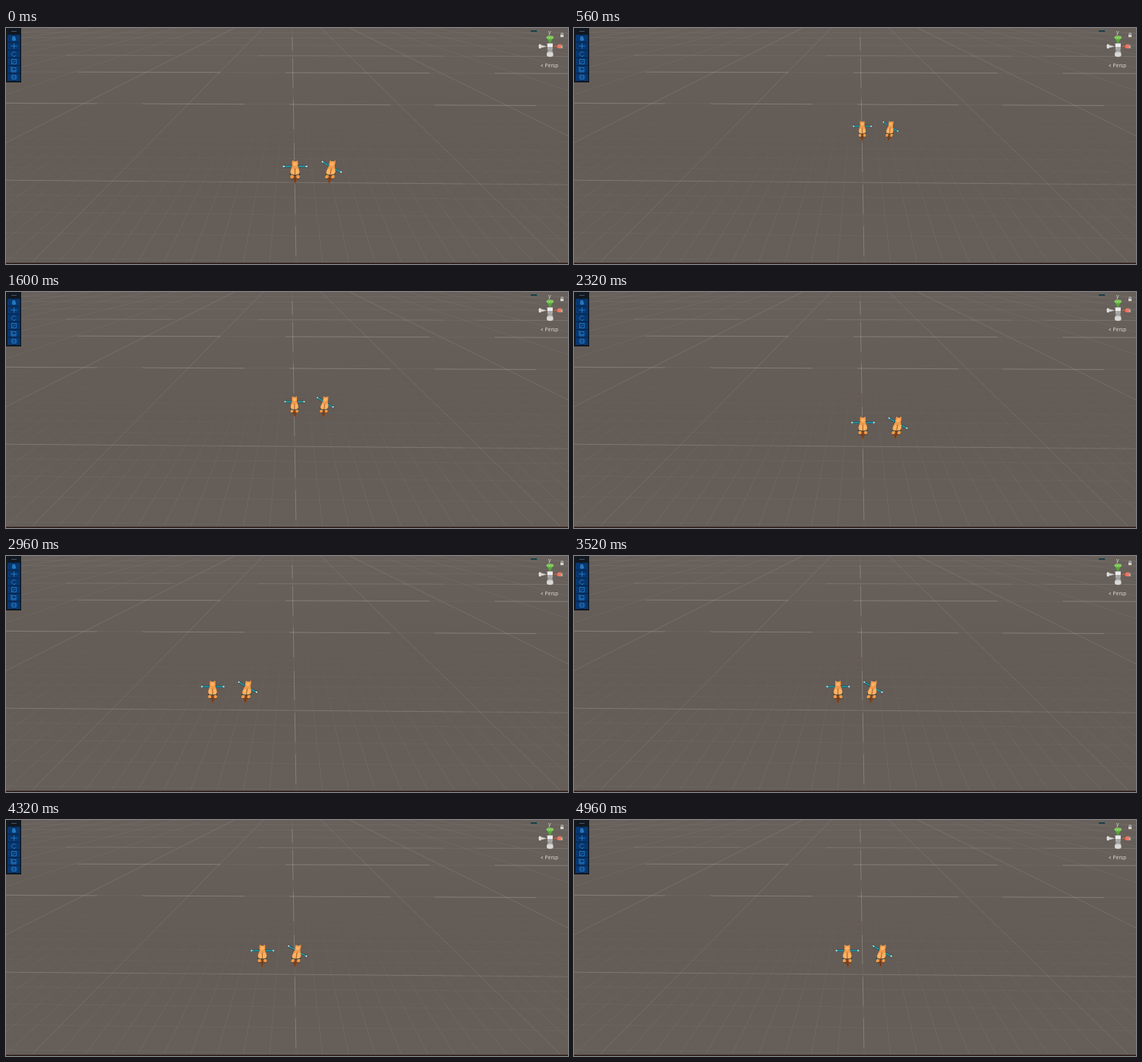
An HTML page with a canvas that plays this animation: 740x312 px, repeating every 5040 ms.

```html
<!DOCTYPE html>
<html lang="en">
<head>
<meta charset="utf-8">
<title>Scene view</title>
<style>
html, body { margin: 0; width: 100%; height: 100%; overflow: hidden; background: #655d57; }
canvas { display: block; width: 740px; height: 312px; }
</style>
</head>
<body>
<canvas id="stage" width="740" height="312"></canvas>
<script>
const W = 740, H = 312, LOOP = 5040, STEP = 80;
const HORIZON = -38, NEAR = 244;
const ctx = document.getElementById('stage').getContext('2d');

// Time in ms against depth (1e-5 / pixels below the horizon) and sideways shift.
const depthKeys = [[0, 410], [125, 410], [685, 567], [1280, 400], [1850, 560], [2320, 429], [LOOP, 429]];
const shiftKeys = [[0, 0], [2320, 0], [3017, -118], [3890, 30], [4575, -86], [LOOP, -7]];

function sample(keys, t) {
  const i = Math.max(1, keys.findIndex(k => k[0] >= t));
  const [t0, a] = keys[i - 1], [t1, b] = keys[i];
  return a + (b - a) * (t - t0) / (t1 - t0);
}

const axisX = y => 376 + (y - HORIZON) * 0.0173;

function line(g, x0, y0, x1, y1, color, width = 1) {
  g.strokeStyle = color;
  g.lineWidth = width;
  g.beginPath();
  g.moveTo(x0, y0);
  g.lineTo(x1, y1);
  g.stroke();
}

function poly(g, color, ...pts) {
  g.fillStyle = color;
  g.beginPath();
  for (let i = 0; i < pts.length; i += 2) g.lineTo(pts[i], pts[i + 1]);
  g.fill();
}

function oval(g, color, x, y, rx, ry) {
  g.fillStyle = color;
  g.beginPath();
  g.ellipse(x, y, rx, ry, 0, 0, 7);
  g.fill();
}

function rect(g, color, x, y, w, h) {
  g.fillStyle = color;
  g.fillRect(x, y, w, h);
}

const white = a => `rgba(225,225,225,${a})`;

function drawGrid(g) {
  const bg = g.createLinearGradient(0, 0, 0, H);
  bg.addColorStop(0, '#67605b');
  bg.addColorStop(0.5, '#635b55');
  bg.addColorStop(1, '#665e58');
  rect(g, bg, 0, 0, W, H);

  const fade = g.createLinearGradient(0, 105, 0, 270);
  fade.addColorStop(0, white(0));
  fade.addColorStop(1, white(0.07));
  const rail = (k, y0, y1, color) =>
    line(g, axisX(y0) + k * (y0 - HORIZON), y0, axisX(y1) + k * (y1 - HORIZON), y1, color);

  for (let i = -40; i <= 40; i++) if (i % 10) rail(i / 10, 105, 309, fade);
  for (let k = -8; k <= 8; k++) if (k) rail(k, 0, 309, white(Math.abs(k) < 3 ? 0.12 : 0.05));
  rail(0, 0, 309, white(0.07));
  for (const y of [12, 40, 95, 152, 207, 262]) rail(0, y, y + (y < 40 ? 18 : 39), white(0.19));

  // Cross lines are evenly spaced in depth and tilt slightly down to the right.
  const cross = (u, x0, x1, color) => {
    const mid = 1e5 / u + HORIZON, tilt = (mid - HORIZON) * 0.000033;
    line(g, x0, mid + (x0 - 370) * tilt, x1, mid + (x1 - 370) * tilt, color);
  };
  for (let i = -9; i <= 4; i++) {
    const u = 413 - 31 * i;
    if (i) cross(u, 0, W, white(i < 0 ? 0.035 * (10 + i) / 10 : 0.045));
  }
  for (let i = 0; i < 7; i++) cross(413 + 308 * i, 0, W, white(i ? 0.05 : 0.14));
  const dashes = [
    [413, [[0, 185], [290, 372], [380, 600]], 0.06],
    [719, [[0, 120], [180, 314], [373, 506], [565, 698]], 0.2],
    [1031, [[95, 282], [368, 557], [643, W]], 0.2],
    [1340, [[80, 222], [332, 576], [620, W]], 0.1]
  ];
  for (const [u, spans, a] of dashes) for (const [a0, a1] of spans) cross(u, a0, a1, white(a));

  rect(g, '#291918', 0, 310.5, W, 1.5);
}

function drawToolbar(g) {
  rect(g, '#111820', 0, 0, 20, 72);
  rect(g, '#4a5058', 7, 4, 7, 1);
  rect(g, '#08376f', 2, 9, 16.5, 61);
  const ink = '#2277bd';
  for (let y = 19; y < 65; y += 10.2) line(g, 2, y, 18.5, y, '#0a2140');
  oval(g, ink, 10.5, 14.5, 2.6, 2.6);
  rect(g, ink, 8.5, 11, 3.5, 3);
  line(g, 6.5, 24, 14.5, 24, ink);
  line(g, 10.5, 20.5, 10.5, 27.5, ink);
  g.strokeStyle = ink;
  g.lineWidth = 0.9;
  g.beginPath();
  g.arc(10.5, 34.5, 3, 0.4, 5.6);
  g.stroke();
  g.strokeRect(7.5, 41.5, 6, 6);
  line(g, 8.5, 46.5, 12, 43, ink);
  g.strokeRect(8, 52.5, 5, 4);
  line(g, 7, 51, 7, 58, ink);
  line(g, 7, 58, 14, 58, ink);
  g.strokeRect(8, 62.5, 5, 5);
  line(g, 6.5, 65, 14.5, 65, ink);
}

function label(g, text, x, y, size) {
  g.font = `${size}px Inter, Roboto, sans-serif`;
  g.fillStyle = '#d9d7d4';
  g.fillText(text, x, y);
}

function drawGizmo(g) {
  rect(g, '#173f49', 691, 3, 8, 2);
  poly(g, '#cfcdca', 702, 21.5, 702, 27, 712, 24.5);
  oval(g, '#e1dfdc', 703, 24.2, 1.6, 3);
  poly(g, '#c95a43', 731, 21.5, 731, 27, 721, 24.5);
  oval(g, '#e57a62', 729, 24.3, 3.2, 2.8);
  poly(g, '#55a83a', 711.5, 12, 721, 12, 716.3, 21);
  oval(g, '#82cc5f', 716.3, 12.5, 4.8, 2.2);
  rect(g, '#aaa8a5', 712.8, 20.5, 7, 8);
  rect(g, '#eeeceb', 712.8, 20.5, 7, 4.5);
  poly(g, '#a5a3a0', 714, 28, 719, 28, 720.5, 34, 712, 34);
  oval(g, '#d9d7d5', 716.3, 35, 4.4, 3.2);
  label(g, 'y', 713.8, 8, 7);
  label(g, 'x', 730.5, 26.5, 6);
  rect(g, '#d5d3d0', 730, 9, 4.2, 3);
  g.strokeStyle = '#d5d3d0';
  g.lineWidth = 0.8;
  g.strokeRect(731, 7, 2.2, 3);
  label(g, '<', 703.5, 51.5, 6.5);
  label(g, 'Persp', 709.5, 51.5, 6.5);
}

const backdrop = document.createElement('canvas');
backdrop.width = W;
backdrop.height = H;
const bg = backdrop.getContext('2d');
drawGrid(bg);
drawToolbar(bg);
drawGizmo(bg);

function arm(x0, y0, x1, y1) {
  const mix = k => [x0 + (x1 - x0) * k, y0 + (y1 - y0) * k];
  line(ctx, x0, y0, x1, y1, '#263d42', 2.8);
  line(ctx, ...mix(0.08), ...mix(1), '#2599a8', 1.8);
  line(ctx, ...mix(0.84), ...mix(1), '#d9e1dc', 2);
}

// Origin is the tip of the tail; arms are [left hand, right hand].
function drawFigure(x, y, scale, lean, hands, sway) {
  ctx.save();
  ctx.translate(x, y);
  ctx.scale(scale, Math.sqrt(scale));
  const [lx, ly, rx, ry] = hands, mid = (ly + ry) / 2;
  arm(lx * 0.22, mid + (ly - mid) * 0.22, lx, ly);
  arm(rx * 0.22, mid + (ry - mid) * 0.22, rx, ry);
  ctx.transform(1, 0, lean, 1, -lean * -18, 0);
  const fur = '#ef9a4a', light = '#ffb263', dark = '#3c2b22', brown = '#8c4a20';
  poly(ctx, dark, -6.3, -14, 6.3, -14, 5.8, -7, 2, -6, -2, -6, -5.8, -7);
  oval(ctx, fur, -3.8, -9.5, 2.5, 2.6);
  oval(ctx, fur, 3.8, -9.5, 2.5, 2.6);
  poly(ctx, fur, -3.5, -25, 3.5, -25, 6.2, -16, 5, -11.5, 1, -12, -1, -12, -5, -11.5, -6.2, -16);
  oval(ctx, light, -2.9, -16, 2.4, 4);
  oval(ctx, light, 2.9, -16, 2.4, 4);
  line(ctx, 0, -20, 0, -10, '#9a5c2c', 0.9);
  line(ctx, -5.8, -12.4, -2, -11.6, '#27545a', 1.1);
  line(ctx, 5.8, -12.4, 2, -11.6, '#27545a', 1.1);
  oval(ctx, fur, 0, -26.2, 4, 3.7);
  poly(ctx, fur, -4, -27, -3.6, -31, -0.8, -29.4);
  poly(ctx, fur, 4, -27, 3.6, -31, 0.8, -29.4);
  oval(ctx, light, 0, -26, 2.6, 2.4);
  poly(ctx, brown, -1.8, -10, 1.8, -10, 2.4 + sway, -4, sway + 0.6, 0, sway - 1.6, -3);
  line(ctx, 0.2, -8, sway, -2.5, '#5a3018', 1);
  ctx.restore();
}

function draw(time) {
  const t = Math.floor(time % LOOP / STEP) * STEP;
  const below = 1e5 / sample(depthKeys, t);
  const scale = below / NEAR, y = HORIZON + below;
  const x = axisX(y) + 0.3 + sample(shiftKeys, t);
  const sway = Math.sin(t / 190) * 0.9;
  ctx.drawImage(backdrop, 0, 0);
  drawFigure(x, y, scale, 0, [-15.8, -23, 16.2, -23], sway);
  drawFigure(x + 47.5 * scale, y, scale, -0.17, [-12, -29.5, 14, -15], sway);
}

const start = performance.now();
function tick() {
  draw(performance.now() - start);
  requestAnimationFrame(tick);
}
tick();
</script>
</body>
</html>
```
